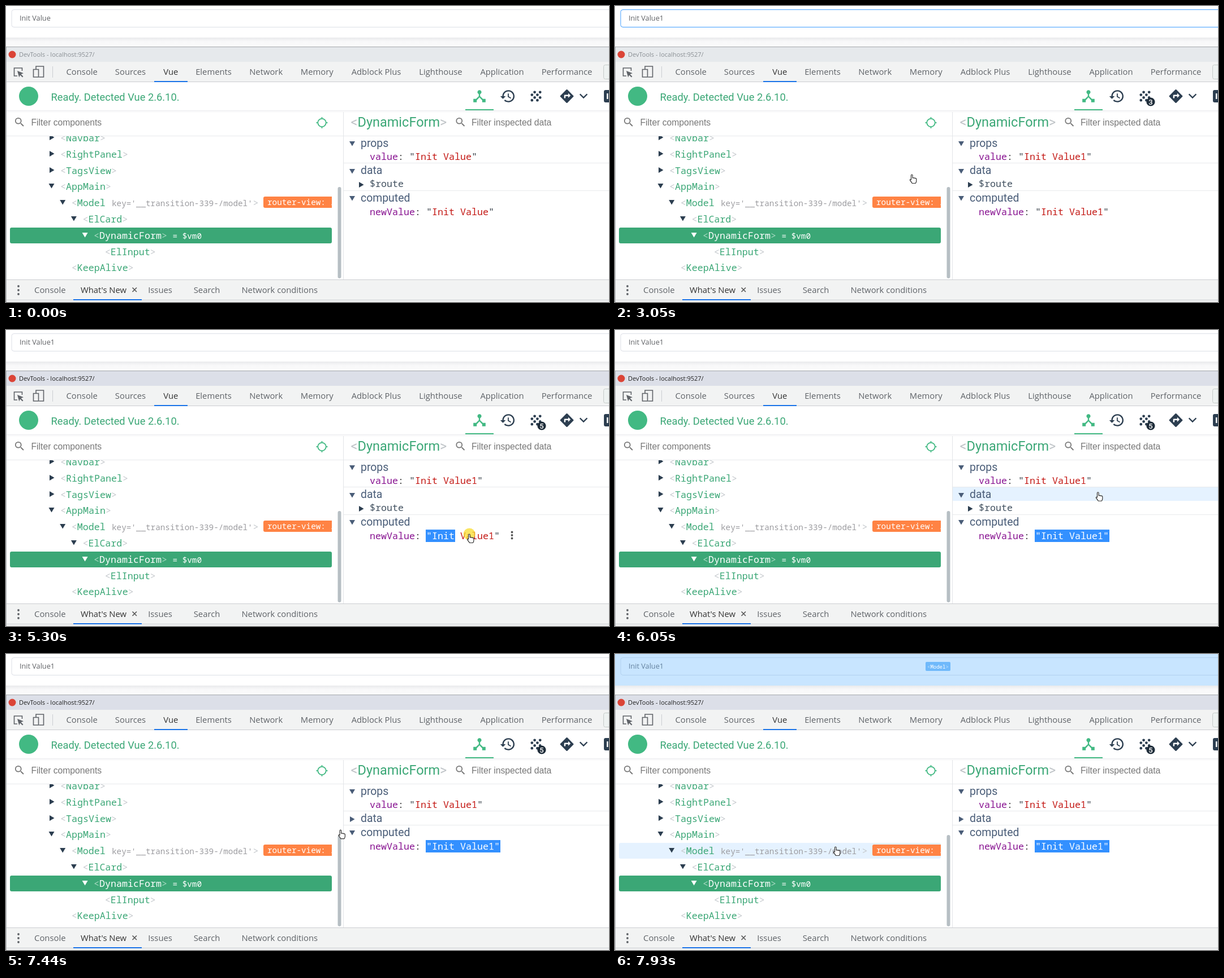
Write an HTML page that moves like this. It is 1066x525 px and loops after 8000 ms.

```html
<!DOCTYPE html>
<html lang="en">
<head>
<meta charset="utf-8">
<title>Component inspector</title>
<style>
html, body { margin: 0; width: 100%; height: 100%; overflow: hidden; background: #fff; }
svg { display: block; width: 1066px; height: 525px; }
text { white-space: pre; }
.ui { font: 14.8px "Open Sans", sans-serif; text-anchor: middle; }
.input { font: 12.7px "Open Sans", sans-serif; }
.title { font: 11px "Open Sans", sans-serif; }
.status { font: 18.3px Roboto, sans-serif; }
.filter { font: 15.7px "Liberation Sans", Arial, sans-serif; }
.head { font: 23.5px Roboto, sans-serif; }
.section { font: 19.4px Roboto, sans-serif; }
.mono { font: 16.67px "Noto Sans Mono", monospace; }
.small { font: 14.3px "Noto Sans Mono", monospace; }
.tiny { font: 9px "Noto Sans Mono", monospace; }
.badge { font: 500 13px Roboto, sans-serif; text-anchor: middle; }
</style>
</head>
<body>
<svg id="stage" viewBox="0 0 1066 525" xmlns="http://www.w3.org/2000/svg"></svg>
<script>
const LOOP = 8000;
const GREEN = '#3ba776', TEAL = '#42b983', SLATE = '#4a5d78', DARK = '#2c3e50', BLUE = '#1a73e8';

const esc = s => s.replace(/&/g, '&amp;').replace(/</g, '&lt;');
const text = (x, y, s, cls, fill, more = '') =>
  `<text x="${x}" y="${y}" class="${cls}" fill="${fill}" ${more}>${esc(s)}</text>`;
const rect = (x, y, w, h, fill, more = '') =>
  `<rect x="${x}" y="${y}" width="${w}" height="${h}" fill="${fill}" ${more}/>`;
const dot = (x, y, r, fill, more = '') => `<circle cx="${x}" cy="${y}" r="${r}" fill="${fill}" ${more}/>`;
const path = (d, fill, more = '') => `<path d="${d}" fill="${fill}" ${more}/>`;
const line = (d, stroke, w = 1, more = '') => path(d, 'none', `stroke="${stroke}" stroke-width="${w}" ${more}`);
const group = (id, body, more = '') => `<g id="${id}" ${more}>${body}</g>`;
const triDown = (x, y, fill) => path(`M${x - 5} ${y - 4}h10l-5 8.5z`, fill);
const triRight = (x, y, fill) => path(`M${x - 4} ${y - 5}v10l8.5-5z`, fill);

// Icons on a 24 unit grid, placed by their centre
const icon = (x, y, k, fill, d) =>
  path(d, fill, `fill-rule="evenodd" transform="translate(${x} ${y}) scale(${k}) translate(-12 -12)"`);
const ring = (x, y, r) => `M${x - r} ${y}a${r} ${r} 0 1 0 ${2 * r} 0a${r} ${r} 0 1 0 ${-2 * r} 0z`;
const ICONS = {
  hub: 'M17 16l-4-4V8.820A3 3 0 1 0 11 8.820V12l-4 4H3v5h5v-3.050l4-4.200 4 4.200V21h5v-5z',
  history: 'M13 3a9 9 0 0 0-9 9H1l3.900 3.900L9 12H6a7 7 0 1 1 2.060 4.940l-1.420 1.420A9 9 0 1 0 13 3zM12 8v5l4.280 2.540.720-1.210-3.500-2.080V8z',
  grain: [6, 10, 14, 18].map((y, r) => [6, 14].map(x => ring(x + (r + 1) % 2 * 4, y, 2)).join('')).join(''),
  turn: 'M21.700 11.300l-9-9a1 1 0 0 0-1.400 0l-9 9a1 1 0 0 0 0 1.400l9 9a1 1 0 0 0 1.400 0l9-9a1 1 0 0 0 0-1.400zM14 14.500V12h-4v3H8v-4q0-1 1-1h5V7.500l3.500 3.500z',
  chevron: 'M16.600 8.600L12 13.200 7.400 8.600 6 10l6 6 6-6z',
  search: ring(9.5, 9.5, 6.5) + ring(9.5, 9.5, 4.5) + 'M14 15.500v-.800l.700-.700h.800l5 5-1.500 1.500z',
  target: ring(12, 12, 9) + ring(12, 12, 7) + 'M11 1h2v2h-2zM11 21h2v2h-2zM1 11h2v2h-2zM21 11h2v2h-2z',
  eye: 'M12 4.500C7 4.500 2.700 7.600 1 12c1.700 4.400 6 7.500 11 7.500s9.300-3.100 11-7.500c-1.700-4.400-6-7.500-11-7.500z' +
    ring(12, 12, 5) + ring(12, 12, 3)
};

function page() {
  return rect(0, 0, 1066, 73, '#fff') +
    rect(0, 56, 1066, 17, 'url(#shade)') +
    `<rect id="field" x="10" y="6.500" width="1070" height="31" rx="4" fill="#fff" stroke="#dcdfe6"/>` +
    text(24, 26, '', 'input', '#606266', 'id="fieldText"') +
    rect(0, 13, 1, 17, '#222', 'id="caret"') +
    group('overlay', rect(0, 0, 1066, 56, '#68b6ff', 'opacity=".36"') +
      rect(549, 14, 44, 16, '#6fb9fb', 'rx="2"') +
      `<text x="552" y="25.500" class="tiny" fill="#fff"><tspan opacity=".6">&lt;</tspan>Model<tspan opacity=".6">&gt;</tspan></text>`);
}

function toolbar() {
  const tabs = [['Console', 134.2], ['Sources', 220], ['Vue', 291.3], ['Elements', 367], ['Network', 459.7], ['Memory', 549.8],
    ['Adblock Plus', 654.5], ['Lighthouse', 768.5], ['Application', 877], ['Performance', 991.5]];
  return rect(0, 73, 1066, 26, '#e6e9ec', 'id="titleBar"') + rect(0, 72, 1066, 1, '#a4a8ac') +
    dot(11, 86, 6.5, '#db4437') + text(23, 90, 'DevTools - localhost:9527/', 'title', '#8a8f94', 'id="titleText"') +
    rect(0, 99, 1066, 36, '#f2f3f3') + rect(0, 134, 1066, 1, '#cbcdd1') +
    line('M20 124h-5.500v-14h14v5', '#5f6368', 1.6) + path('M20 115l11 4.200-4.500 1.800 4 4-1.500 1.500-4-4-1.800 4z', '#5f6368') +
    line('M53 112v-5h13.500v19h-8M48.500 112.500h9v13.500h-9z', '#5f6368', 1.6) + rect(82, 107, 1, 20, '#cbcdd1') +
    tabs.map(([s, x]) => text(x, 122, s, 'ui', s === 'Vue' ? '#333' : '#5f6368')).join('') +
    rect(262, 133, 59, 2, BLUE) +
    `<rect x="1056.500" y="104.500" width="30" height="25" rx="3" fill="#eef2f1" stroke="#c6cbc9"/>` +
    rect(0, 135, 1066, 50, '#fff') + rect(0, 185, 1066, 4, 'url(#shade)') +
    dot(40, 160, 17, TEAL) + text(79.5, 168, 'Ready. Detected Vue 2.6.10.', 'status', GREEN) +
    icon(837, 160, 1.2, TEAL, ICONS.hub) + rect(812, 183, 50, 2, TEAL) +
    icon(887, 160, 1.2, DARK, ICONS.history) + icon(937, 160, 1.2, DARK, ICONS.grain) +
    icon(991.5, 160, 1.2, DARK, ICONS.turn) + icon(1021, 159.5, 1.2, DARK, ICONS.chevron) +
    rect(1057, 149, 20, 22, DARK, 'rx="3"') + rect(1062, 155, 2.5, 10, '#fff') +
    group('events', dot(947, 170, 7.6, '#1f2d3a') + text(947, 174.5, '', 'badge', '#fff', 'id="eventCount"'));
}

function tree() {
  const rows = [['Navbar', 0, 1], ['RightPanel', 0, 1], ['TagsView', 0, 1], ['AppMain', 0, 2], ['Model', 1, 2],
    ['ElCard', 2, 2], ['DynamicForm', 3, 2], ['ElInput', 4, 0], ['KeepAlive', 1, 0]];
  const body = rows.map(([name, depth, arrow], i) => {
    const x = 96 + depth * 19.7, y = Math.round(240 + i * 28.8), on = name === 'DynamicForm';
    const fade = on ? '#a8d9c2' : '#c4c8cc', ink = on ? '#fff' : DARK, end = x + 10 + name.length * 10;
    const mark = arrow === 1 ? triRight(x - 15, y - 7, ink) : arrow ? triDown(x - 15.5, y - 7, ink) : '';
    const model = name === 'Model';
    return mark + text(x, y, '<', 'mono', fade) + text(x + 10, y, name, 'mono', on ? '#fff' : GREEN) +
      text(model ? 436.5 : end, y, '>', 'mono', fade) +
      (model ? text(187, y, "key='__transition-339-/model'", 'small', '#9c9ca0') +
        rect(455, 338, 130, 20, '#ff8344', 'rx="3"') + text(462, 353, 'router-view: /model', 'small', '#fff') : '') +
      (on ? text(294.5, y, '= $vm0', 'small', '#fff') : '');
  }).join('');
  return rect(0, 230, 596, 1, '#e8eaec') + icon(24, 206, .9, '#777', ICONS.search) +
    text(44.5, 212, 'Filter components', 'filter', '#777') + icon(558.5, 207, .9, TEAL, ICONS.target) +
    `<g clip-path="url(#treeClip)">` + rect(7, 0, 569, 28, '#e5f2ff', 'id="rowHover" rx="3"') +
    rect(7, 393, 569, 28, GREEN, 'rx="3"') + body + '</g>' +
    group('eye', icon(558, 321, .87, '#8c939b', ICONS.eye)) +
    rect(586.5, 321, 6, 162, '#b7bfc4', 'rx="3"');
}

function inspector() {
  const key = (x, y, s) => `<text x="${x}" y="${y}" class="mono" fill="#881391">${s}<tspan fill="#333">:</tspan></text>`;
  return rect(596, 188, 1, 297, '#e3e5e8') + rect(597, 230, 469, 1, '#e8eaec') +
    `<text x="609.500" y="214" class="head" fill="#bfc3c7">&lt;<tspan fill="${GREEN}">DynamicForm</tspan>&gt;</text>` +
    icon(803.5, 206, .9, '#777', ICONS.search) + text(823, 212, 'Filter inspected data', 'filter', '#777') +
    rect(597, 0, 469, 24, '#e5f2ff', 'id="sectionHover"') +
    triDown(612, 244, SLATE) + text(627, 250, 'props', 'section', SLATE) +
    key(643, 273, 'value') + text(713, 273, '', 'mono', '#c41a16', 'id="propValue"') +
    rect(597, 278, 469, 1, '#e8eaec') + text(627, 298, 'data', 'section', SLATE) +
    group('opened', triDown(612, 293, SLATE) + triRight(628, 317, DARK) + text(643, 321, '$route', 'mono', '#41505f')) +
    group('closed', triRight(612, 293, SLATE)) +
    group('computed', rect(597, 327, 469, 1, '#e8eaec') + triDown(612, 341, SLATE) +
      text(627, 347, 'computed', 'section', SLATE) + key(643, 371, 'newValue') +
      rect(742, 354, 0, 22, '#3390ff', 'id="selection"') + text(743, 371, '', 'mono', '#c41a16', 'id="newValue"') +
      group('more', [358.5, 364, 369.5].map(y => dot(894.5, y, 1.9, '#555')).join('')));
}

function drawer() {
  const tabs = [['Console', 77.8], ["What's New", 172.5], ['Issues', 272.5], ['Search', 355], ['Network conditions', 483.8]];
  return rect(0, 485, 1066, 40, '#f2f3f3') + rect(0, 485, 1066, 1, '#cbcdd1') + rect(0, 521, 1066, 1, '#cbcdd1') +
    [497, 504, 511].map(y => dot(22, y, 1.9, '#5f6368')).join('') +
    tabs.map(([s, x], i) => text(x, 509, s, 'ui', i === 1 ? '#333' : '#5f6368')).join('') +
    line('M223.500 499.500l7.500 7.500M231 499.500l-7.500 7.500', '#555', 1.6) + rect(119, 520, 121, 2, BLUE) +
    rect(0, 73, 1, 452, '#b3b6ba');
}

function pointer() {
  const outline = 'stroke-width="1.200" stroke-linejoin="round"';
  return dot(0, 0, 10.5, '#f8dc2e', 'id="press" opacity=".75"') +
    group('cursor',
      group('arrow', path('M0 0v17l4-3.700 3 6.700 3-1.300-3-6.500h5.400z', '#000', `stroke="#fff" ${outline}`)) +
      group('ibeam', line('M-3 -8h2.500l.5.500.500-.500h2.500M0 -7.500v15M-3 8h2.500l.5-.500.500.500h2.500', '#222', 1.2)) +
      group('hand', path('M-1.500 1.500q0-1.500 1.300-1.500t1.300 1.500v4.500q1-.800 2.200.200 1.200-.700 2 .400 1.500-.500 2.500 1v4.400q-.500 2-1.500 3.500h-6q-1-2-3.500-5-.900-1.600.200-2 1-.100 1.500.700z', '#fff', `stroke="#333" ${outline}`)));
}

const stage = document.getElementById('stage');
stage.innerHTML = `<defs>
  <linearGradient id="shade" x1="0" y1="0" x2="0" y2="1"><stop offset="0" stop-color="#e9eaec"/><stop offset=".4" stop-color="#f8f8f9"/><stop offset="1" stop-color="#fbfbfb"/></linearGradient>
  <clipPath id="treeClip"><rect x="0" y="231" width="576" height="254"/></clipPath>
</defs>` + page() + toolbar() + tree() + inspector() + drawer() + pointer();

const el = {};
stage.querySelectorAll('[id]').forEach(n => { el[n.id] = n; });
const show = (n, on) => n.setAttribute('visibility', on ? 'visible' : 'hidden');
const set = (n, name, v) => n.setAttribute(name, v);
const within = (v, a, b) => v >= a && v < b;

// Pointer bursts: start, end, number of steps
const bursts = [[870, 1490, 10], [2630, 3400, 12], [3470, 3950, 8], [4680, 4830, 3],
  [5030, 5440, 7], [5910, 6610, 11], [7030, 7790, 11], [7860, 7930, 2]];
// Pointer way points: time, x, y
const way = [[870, 875, 365], [1010, 655, 205], [1145, 425, 66], [1214, 393, 47], [1490, 399, 31],
  [2560, 399, 31], [2770, 425, 110], [2910, 475, 228], [3050, 525, 299], [3120, 568, 322], [3260, 700, 344], [3400, 780, 346],
  [3950, 740, 363], [4680, 740, 363], [4830, 743, 364], [5098, 744, 364], [5303, 819, 362], [5440, 872, 365],
  [5840, 872, 365], [6120, 848, 262], [6330, 830, 242], [6610, 808, 281],
  [7030, 808, 281], [7258, 700, 309], [7638, 429, 317], [7790, 396, 337], [7860, 391, 341], [7930, 390, 342]];

function stepped(t) {
  const b = bursts.filter(s => t >= s[0]).pop();
  if (!b) return 0;
  const dt = (b[1] - b[0]) / (b[2] - 1);
  return b[0] + Math.min(b[2] - 1, Math.floor((t - b[0] + 6) / dt)) * dt;
}

function pointerAt(t) {
  const i = way.findIndex(p => p[0] > t);
  if (i < 0) return way[way.length - 1].slice(1);
  if (i === 0) return way[0].slice(1);
  const a = way[i - 1], b = way[i], k = (t - a[0]) / (b[0] - a[0]);
  return [a[1] + (b[1] - a[1]) * k, a[2] + (b[2] - a[2]) * k];
}

function quoted(node, value, picked) {
  const id = value + picked;
  if (node.dataset.shown === id) return;
  node.dataset.shown = id;
  node.innerHTML = [...`"${value}"`].map((c, i) =>
    `<tspan fill="${i < picked ? '#fff' : c === '"' ? '#303942' : '#c41a16'}">${c}</tspan>`).join('');
}

function render(t) {
  const typed = t >= 2160, focused = within(t, 1760, 5030), collapsed = t >= 7030;
  const value = typed ? 'Init Value1' : 'Init Value';
  const picked = t < 5160 ? 0 : t < 5230 ? 2 : t < 5365 ? 5 : t < 5435 ? 9 : 13;
  const [x, y] = pointerAt(stepped(t));
  const shift = collapsed ? -24 : 0;

  el.fieldText.textContent = value;
  set(el.field, 'stroke', focused ? '#409eff' : '#dcdfe6');
  set(el.caret, 'x', typed ? 86 : 80);
  show(el.caret, focused && (!typed || Math.floor((t - 2160) / 530) % 2 === 0));
  show(el.overlay, t >= 7860);

  set(el.titleBar, 'fill', t < 5030 ? '#e6e9ec' : '#dcdfe8');
  set(el.titleText, 'fill', t < 5030 ? '#8a8f94' : '#222');
  show(el.events, t >= 1760);
  el.eventCount.textContent = t >= 5030 ? 5 : typed ? 3 : 1;

  quoted(el.propValue, value, 0);
  quoted(el.newValue, value, picked);
  set(el.selection, 'width', picked ? picked * 10 + 2 : 0);
  set(el.computed, 'transform', `translate(0 ${shift})`);
  show(el.opened, !collapsed);
  show(el.closed, collapsed);

  const right = x >= 597 && t > 3000;
  const top = [231, 279, 328 + shift].find(s => within(y, s, s + 24));
  show(el.sectionHover, right && top);
  set(el.sectionHover, 'y', top || 0);
  show(el.more, right && within(y, 353 + shift, 377 + shift));

  const row = Math.floor((y - 220.2) / 28.8);
  const left = t > 3110 && within(x, 7, 576) && row >= 0 && row < 9;
  show(el.rowHover, left);
  set(el.rowHover, 'y', Math.round(220.2 + row * 28.8));
  show(el.eye, left && row === 3);

  const seen = t >= 870;
  const beam = y < 38, hand = t > 2600 && y > 230;
  set(el.cursor, 'transform', `translate(${x} ${y})`);
  show(el.ibeam, seen && beam);
  show(el.hand, seen && hand);
  show(el.arrow, seen && !beam && !hand);
  set(el.press, 'transform', `translate(${x} ${y})`);
  show(el.press, within(t, 1760, 1900) || within(t, 5030, 5640) || within(t, 6810, 7030));
}

let start;
function tick(now) {
  if (start === undefined) start = now;
  render((now - start) % LOOP);
  requestAnimationFrame(tick);
}
render(0);
requestAnimationFrame(tick);
</script>
</body>
</html>
```
